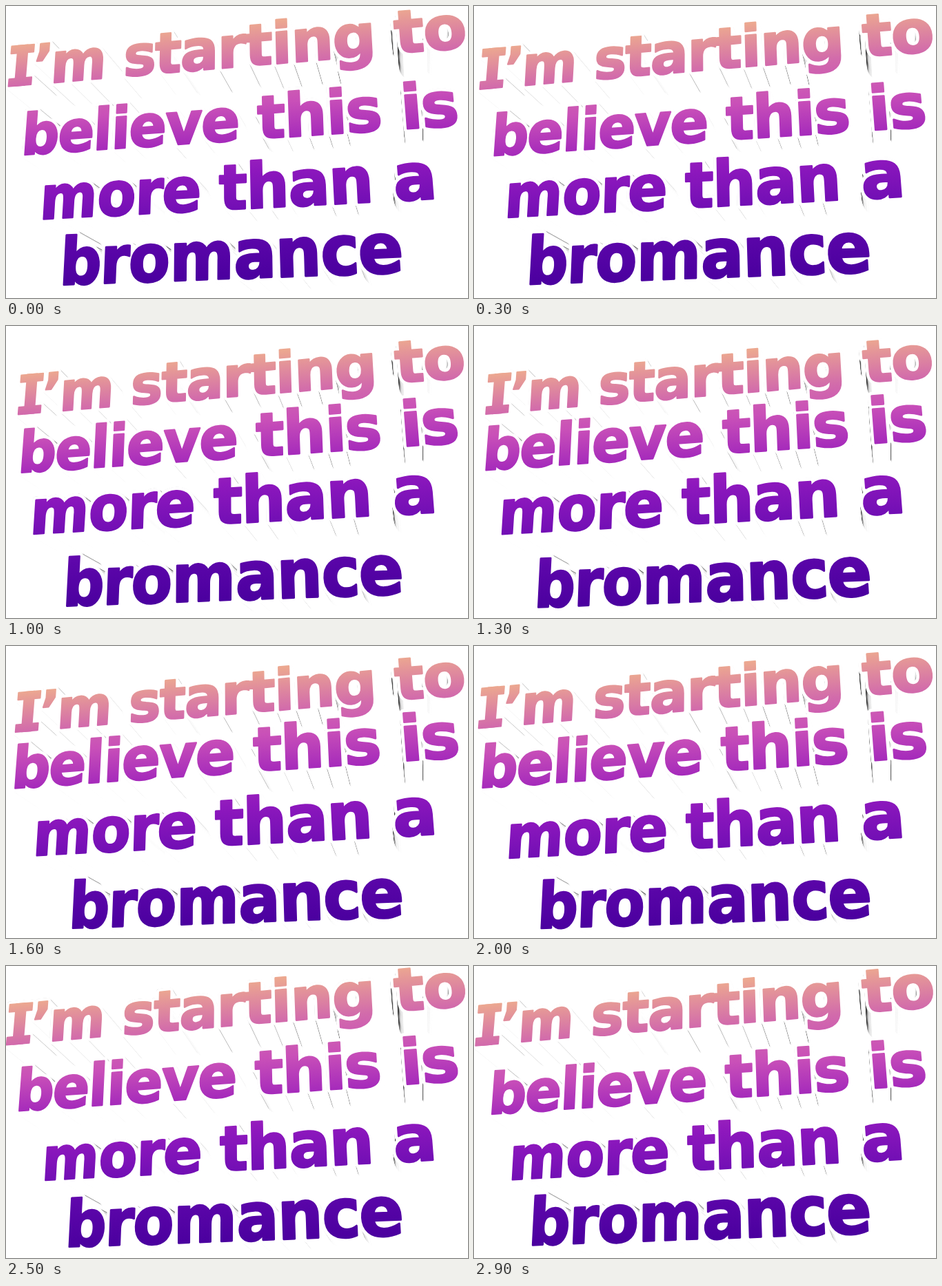
Animation of 670x424 px, one loop 3 s. Source, as an HTML page with a canvas:

```html
<!DOCTYPE html>
<html lang="en">
<head>
<meta charset="utf-8">
<title>Wave text</title>
<style>
  html, body { margin: 0; width: 100%; height: 100%; overflow: hidden; background: #fff; }
  canvas { display: block; width: 670px; height: 424px; }
</style>
</head>
<body>
<canvas id="stage" width="670" height="424"></canvas>
<script>
const LINES = ['I’m starting to', 'believe this is', 'more than a', 'bromance'];
const LOOP = 3000, STEP = 100;
const EM = 100, LEAD = 1.12, ASPECT = .91;
const ADVANCE = {
  I: .483, '’': .28, ' ': .293, a: .599, b: .632, c: .527, e: .594, g: .629, h: .64, i: .302,
  l: .302, m: .954, n: .64, o: .617, r: .434, s: .515, t: .416, v: .58
};
const COLOURS = [[0, '#eca890'], [.18, '#d26bab'], [.31, '#c950b8'], [.46, '#a52abb'],
                 [.58, '#8e18bd'], [.74, '#700eb4'], [.84, '#5d06aa'], [1, '#4b009f']];

// Camera: homogeneous images of the text axes, the origin and the depth axis.
const U = [86.2, -9, -.0145];
const V = [-8.2, 90.6, -.0265];
const O = [320.1, 95.5, 1];
const Z = [600, 605, 1];

const BACK = .055, SWING = .0154, SLICE = .0014;
const LIGHT = [.7, .95];
const BOLD = 3, EDGE = 10.5, HALO = 13, BOX = 180;

function project(u, v, z) {
  const [px, py, w] = O.map((o, i) => o + u * U[i] + v * V[i] + z * Z[i]);
  const x = px / w, y = py / w;
  const slope = axis => [(axis[0] - x * axis[2]) / w, (axis[1] - y * axis[2]) / w];
  return { x, y, w, du: slope(U), dv: slope(V) };
}

function makeCanvas(w, h) {
  const c = document.createElement('canvas');
  c.width = w;
  c.height = h;
  return c;
}

const ctx = document.getElementById('stage').getContext('2d');

function drawGlyph(c, g, pose, x, y, colour, stroke) {
  const { du, dv } = pose, h = ASPECT / EM, k = EM * LEAD, base = .3 * EM;
  c.setTransform(du[0] * h, du[1] * h, dv[0] / k, dv[1] / k, x, y);
  c.font = `bold ${EM}px "DejaVu Sans", Verdana, sans-serif`;
  c.textAlign = 'center';
  c.textBaseline = 'alphabetic';
  c.lineJoin = 'round';
  c.fillStyle = c.strokeStyle = colour;
  c.lineWidth = stroke;
  c.strokeText(g.ch, 0, base);
  c.fillText(g.ch, 0, base);
  if (g.ch === 'I') {
    for (const top of [base - 72.9, base - 13]) {
      c.strokeRect(-21.5, top, 43, 13);
      c.fillRect(-21.5, top, 43, 13);
    }
  }
  c.setTransform(1, 0, 0, 1, 0, 0);
}

// One slice of a letter: dark, with the lit sides covered in white.
function makeSlice(g) {
  const c = makeCanvas(BOX, BOX), s = c.getContext('2d'), m = BOX / 2;
  drawGlyph(s, g, g.rest, m, m, '#000', EDGE);
  drawGlyph(s, g, g.rest, m + LIGHT[0], m + LIGHT[1], '#fff', EDGE + .6);
  return c;
}

const glyphs = [];
LINES.forEach((text, row) => {
  const width = [...text].reduce((sum, ch) => sum + ADVANCE[ch], 0);
  const local = v => ((v - row) * LEAD + .3) * EM;
  const shade = ctx.createLinearGradient(0, local(-.67), 0, local(3));
  COLOURS.forEach(([at, colour]) => shade.addColorStop(at, colour));
  let u = -width / 2;
  for (const ch of text) {
    const g = { ch, row, shade, u: u + ADVANCE[ch] / 2, v: row - .3 / LEAD };
    u += ADVANCE[ch];
    if (ch === ' ') continue;
    g.rest = project(g.u, g.v, 0);
    g.slice = makeSlice(g);
    glyphs.push(g);
  }
});

const depth = (row, t) => -SWING * Math.cos(2 * Math.PI * (t - 2600 + 750 * row) / LOOP);

function render(t) {
  const front = LINES.map((_, row) => depth(row, t));
  ctx.fillStyle = '#fff';
  ctx.fillRect(0, 0, 670, 424);

  for (let z = BACK; z > -SWING; z -= SLICE) {
    for (const g of glyphs) {
      if (z < front[g.row]) continue;
      const { x, y, w } = g.rest, k = w / (w + z), size = BOX * k;
      ctx.drawImage(g.slice, Z[0] + (x - Z[0]) * k - size / 2, Z[1] + (y - Z[1]) * k - size / 2, size, size);
    }
  }

  const poses = glyphs.map(g => project(g.u, g.v, front[g.row]));
  glyphs.forEach((g, i) => drawGlyph(ctx, g, poses[i], poses[i].x, poses[i].y, '#fff', HALO));
  glyphs.forEach((g, i) => drawGlyph(ctx, g, poses[i], poses[i].x, poses[i].y, g.shade, BOLD));
}

let shown = -1;
function tick() {
  const t = Math.floor(performance.now() % LOOP / STEP) * STEP;
  if (t !== shown) render(shown = t);
  requestAnimationFrame(tick);
}
tick();
</script>
</body>
</html>
```
